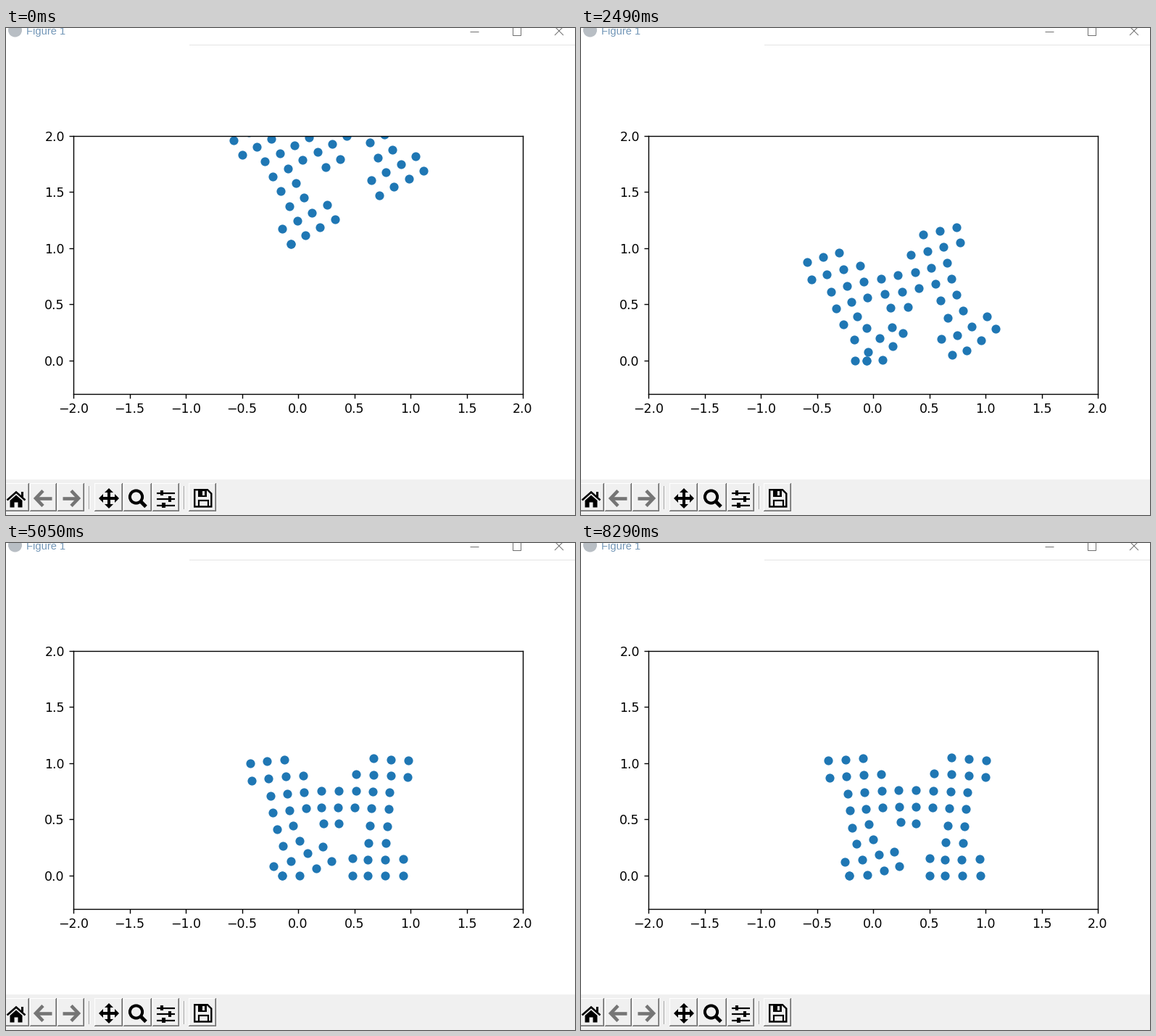
Write a matplotlib script that moves like this. It is 785 by 672 pixels and loops after 8400 ms.

```python
import numpy as np
import matplotlib.pyplot as plt
from matplotlib.animation import FuncAnimation
from matplotlib.patches import Circle, Polygon, Rectangle

W, H, DPI = 785, 672, 125
PX = 72 / DPI            # one pixel in points
GROUND = 458

# ---- soft body: a serif letter on a 10 x 8 lattice, bottom row first ----
# Positions are complex numbers: x + 1j * y, with y pointing down.
SERIF, BAR = "01236789", "12345678"
ROWS = [SERIF, SERIF, "1278", "124578", BAR, BAR, SERIF, "012789"]
col, row = np.array([(int(c), r) for r, cols in enumerate(ROWS) for c in cols]).T
left = col <= 3
lattice = col - 1j * row

# key nodes: column, row, place with the left foot folding, place at rest
KEYS = [(0, 0, 393.5 + 458j, 370 + 458j),
        (1, 0, 416 + 458j, 394.5 + 458j),
        (3, 0, 443.5 + 421j, 438.5 + 445j),
        (0, 1, 377 + 458j, 363.5 + 440j),
        (2, 2, 393.5 + 413.5j, 402.5 + 408.5j),
        (1, 3, 361 + 408.5j, 374 + 392j),
        (0, 7, 311 + 322j, 341 + 299.5j),
        (3, 6, 385 + 327j, 413.5 + 318.5j),
        (4, 4, 418.5 + 367j, 438.5 + 363.5j),
        (6, 5, 460 + 336j, 486 + 341j),
        (7, 7, 472 + 285j, 511 + 296j),
        (9, 7, 517 + 274.5j, 558.5 + 299.5j),
        (8, 3, 517 + 367j, 528.5 + 390j),
        (6, 0, 511 + 451j, 480 + 458j),
        (9, 0, 571 + 415j, 550 + 458j)]


def bend(nodes, places):
    """Thin-plate spline that carries the whole lattice along with its nodes."""
    def kernel(p):
        d = np.abs(p[:, None] - nodes) ** 2
        return d * np.log(d + 1e-12)

    def plane(p):
        return np.column_stack([np.ones(len(p)), p.real, p.imag])

    flat = plane(nodes)
    system = np.block([[kernel(nodes), flat], [flat.T, np.zeros((3, 3))]])
    weights = np.linalg.solve(system, np.append(places, np.zeros(3)))
    return np.hstack([kernel(lattice), plane(lattice)]) @ weights


kc, kr, fold_at, rest_at = np.array(KEYS).T
nodes = kc - 1j * kr
fold, rest = bend(nodes, fold_at), bend(nodes, rest_at)

IMPACT, LAND, END = 37, 78, 166


def falling(n):
    """Rigid letter turned by half a radian, n steps into the drop."""
    corner = 392 + 1j * (297 + 3.14 * n + 0.033 * n * n)
    return corner + 23.25 * np.exp(-0.5j) * lattice


def settling(n):
    """Standing letter: the body eases upright while the left foot creeps out."""
    age = n - LAND
    creep = 1 - age / (END - LAND)
    lean = creep ** 2
    dx = np.where(left, 10.5 * lean - 21.5 * creep * np.exp(-row / 2.6),
                  (4.5 + 0.5 * row) * lean)
    foot = np.where(left, (5.5 * col - 8) * creep, 0)
    dy = np.where(row < 2, foot, -7.5 * lean * np.exp(-col / 3))
    sway = 0.85 * row * np.sin(np.pi * age / 23) * np.exp(-age / 12)
    return rest - dx - 1j * dy + sway


land = settling(LAND)
rebound = fold + (land - fold) * (0.85 - 0.04 * row)
times = np.array([IMPACT, 50, 70, LAND])
poses = np.array([falling(IMPACT), fold, rebound, land])
slopes = np.gradient(poses, times, axis=0)
slopes[0] = falling(IMPACT) - falling(IMPACT - 1)
slopes[-1] = settling(LAND + 1) - land


def tumbling(n):
    """Smooth cubic path through the poses between impact and landing."""
    i = np.searchsorted(times, n, side="right") - 1
    h = times[i + 1] - times[i]
    s = (n - times[i]) / h
    return (poses[i] + (poses[i + 1] - poses[i]) * s * s * (3 - 2 * s)
            + h * s * (1 - s) ** 2 * slopes[i]
            - h * s * s * (1 - s) * slopes[i + 1])


def body(n):
    move = falling if n < IMPACT else tumbling if n < LAND else settling
    p = move(n)
    return p.real, np.minimum(p.imag, GROUND)


# ---- window ----
fig = plt.figure(figsize=(W / DPI, H / DPI), dpi=DPI, facecolor="white")
ui = fig.add_axes([0, 0, 1, 1])
ui.set(xlim=(0, W), ylim=(H, 0))
ui.axis("off")


def box(x0, y0, x1, y1, color):
    ui.add_patch(Rectangle((x0, y0), x1 - x0, y1 - y0, fc=color, lw=0))


def line(xs, ys, width=1, color="black"):
    ui.plot(xs, ys, color=color, lw=width * PX, solid_capstyle="butt",
            solid_joinstyle="miter")


def shape(points, color="black"):
    ui.add_patch(Polygon(points, fc=color, lw=0))


def title_bar():
    ui.add_patch(Circle((12.5, 3), 9.5, fc="#b8bec4", lw=0))
    ui.text(28, 9, "Figure 1", family="Liberation Sans", size=14.6 * PX,
            color="#7397b8", va="baseline")
    grey = "#707070"
    line([640, 652], [4.5, 4.5], 1, grey)
    line([698.5, 709.5, 709.5, 698.5, 698.5], [-1.5, -1.5, 9.5, 9.5, -1.5], 1, grey)
    line([757, 769], [-2, 10], 1, grey)
    line([757, 769], [10, -2], 1, grey)
    box(253, 23, W, 24, "#e4e4e4")


def button(x0, x1):
    box(x0, 628, x1, 667, "#696969")
    box(x0, 628, x1 - 1, 666, "white")
    box(x0 + 1, 629, x1 - 1, 666, "#a0a0a0")
    box(x0 + 1, 629, x1 - 2, 665, "#f0f0f0")


def home():
    line([1.5, 14, 26.5], [651.5, 640.5, 651.5], 2.6)
    shape([(5.5, 652), (14, 644.5), (22.5, 652), (22.5, 661.5), (16.5, 661.5),
           (16.5, 654.5), (11.5, 654.5), (11.5, 661.5), (5.5, 661.5)])
    box(20.5, 640, 23.8, 647, "black")


def arrow(tip, d):
    grey = "#757575"
    line([tip + 12 * d, tip + 2 * d, tip + 12 * d], [638.5, 649, 659.5], 4.6, grey)
    line([tip + 3 * d, tip + 24 * d], [649, 649], 4.6, grey)


def pan(x=142, y=649):
    line([x - 10, x + 10], [y, y], 4)
    line([x, x], [y - 10, y + 10], 4)
    for dx, dy in ((1, 0), (-1, 0), (0, 1), (0, -1)):
        a, b = x + 8 * dx, y + 8 * dy
        shape([(x + 14 * dx, y + 14 * dy), (a - 6 * dy, b + 6 * dx),
               (a + 6 * dy, b - 6 * dx)])


def zoom():
    ui.add_patch(Circle((179.5, 647), 8.6, fill=False, ec="black", lw=4 * PX))
    line([185.5, 193], [653, 660.5], 5)


def sliders():
    for y, knob in ((641.5, 215), (650, 226), (658.5, 217.5)):
        line([208, 233], [y, y], 2.2)
        box(knob - 4, y - 3, knob + 4, y + 3, "#f0f0f0")
        box(knob - 2.4, y - 3.7, knob + 2.4, y + 3.7, "black")


def save():
    line([260.2, 260.2, 283.3, 283.3, 278, 260.2, 260.2],
         [648, 660.5, 660.5, 642.5, 637.2, 637.2, 648], 2.4)
    line([265.5, 265.5, 278.5, 278.5], [660, 651.5, 651.5, 660], 2.2)
    box(264.5, 637, 276.5, 646.5, "black")
    box(271, 638.5, 274, 644.5, "#f0f0f0")


def toolbar():
    box(0, 623, W, H, "#f0f0f0")
    for x0, x1 in ((-6, 32), (33, 70), (71, 108), (122, 161), (162, 201),
                   (202, 239), (252, 290)):
        button(x0, x1)
    for x in (114, 245):
        box(x, 632, x + 1, 664, "#a0a0a0")
        box(x + 1, 632, x + 2, 664, "white")
    home()
    arrow(39, 1)
    arrow(102, -1)
    pan()
    zoom()
    sliders()
    save()


title_bar()
toolbar()

# ---- plot: 155 pixels per unit ----
UNIT, ZERO_X, ZERO_Y = 155, 403, 458.75
ax = fig.add_axes([(ZERO_X - 2 * UNIT) / W, 1 - (ZERO_Y + 0.3 * UNIT) / H,
                   4 * UNIT / W, 2.3 * UNIT / H])
ax.set(xlim=(-2, 2), ylim=(-0.3, 2),
       xticks=np.arange(-2, 2.1, 0.5), yticks=np.arange(0, 2.1, 0.5))
dots, = ax.plot([], [], "o", color="#1f77b4")
anchor, = ax.plot([], [], "o", color="#1f77b4")

STEP = 30                # ms per drawn frame; the body moves every 50 ms


def draw(k):
    x, y = body(min((STEP * k + 20) // 50, END))
    x, y = (x + 0.5 - ZERO_X) / UNIT, (ZERO_Y - y - 0.5) / UNIT
    dots.set_data(x, y)
    anchor.set_data(x[:1], y[:1])
    return dots, anchor


anim = FuncAnimation(fig, draw, frames=8400 // STEP, interval=STEP,
                     repeat=True, repeat_delay=0, blit=False)
plt.show()
```
